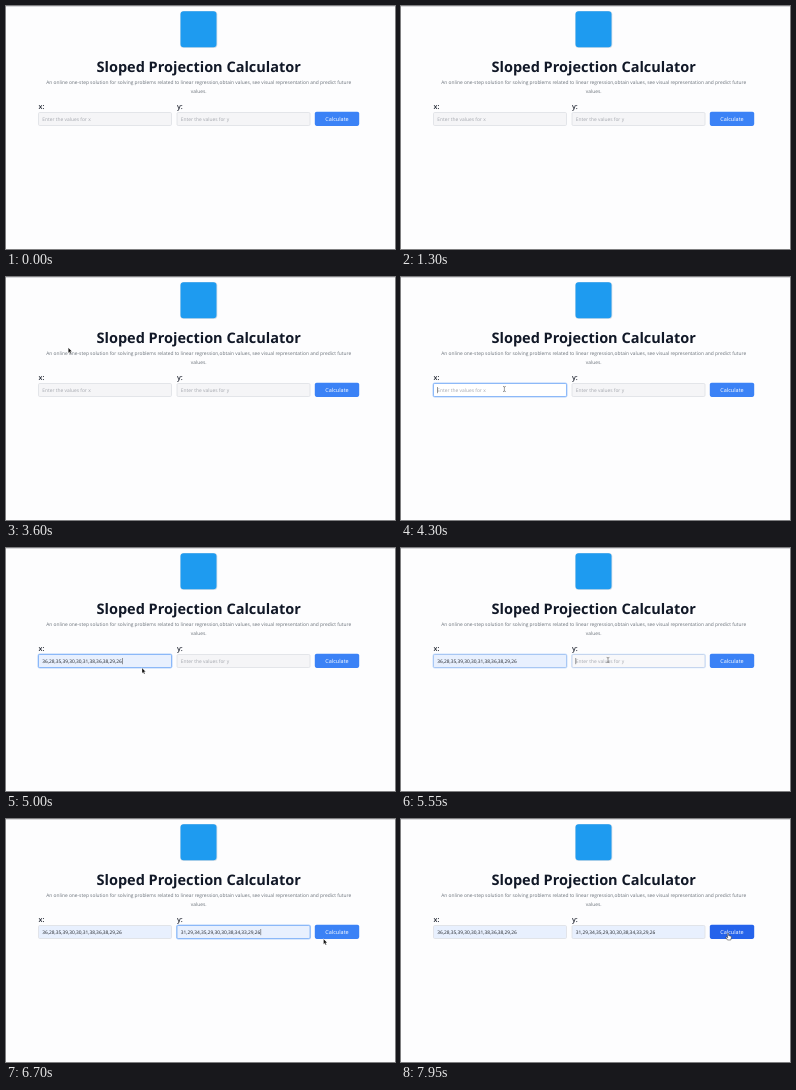
An HTML page that plays this animation: 389x243 px, repeating every 8 s.

```html
<!DOCTYPE html>
<html lang="en">
<head>
<meta charset="utf-8">
<title>Sloped Projection Calculator</title>
<style>
  html, body { margin: 0; width: 100%; height: 100%; overflow: hidden; background: #fdfdfe; }
  svg { display: block; }
  text { font-family: "Open Sans", "Noto Sans", sans-serif; text-rendering: geometricPrecision; }
  .mid { text-anchor: middle; }
  .title { font-size: 14.5px; font-weight: 700; fill: #111827; }
  .intro { font-size: 4.86px; fill: #697079; }
  .label { font-size: 7.2px; font-weight: 600; fill: #1f2430; }
  .hint { font-size: 4.9px; fill: #a3a6ad; }
  .value { font-size: 4.85px; fill: #20242b; }
  .button { font-size: 5.5px; fill: #fff; }
</style>
</head>
<body>
<svg id="stage" width="389" height="243" viewBox="0 0 389 243">
  <rect width="389" height="1" fill="#d9d9dc"/>
  <rect x="174.3" y="5" width="37" height="37" rx="3.5" fill="#d3dde6"/>
  <rect x="174.5" y="5.2" width="36" height="36" rx="3.2" fill="#1e9bf0"/>
  <text class="title mid" x="192.7" y="65.6">Sloped Projection Calculator</text>
  <text class="intro mid" x="192.7" y="78.3">An online one-step solution for solving problems related to linear regression,obtain values, see visual representation and predict future</text>
  <text class="intro mid" x="192.7" y="86.7">values.</text>
  <g id="form"></g>
  <rect id="button" x="308.8" y="105.8" width="44.4" height="14.1" rx="1.8"/>
  <text class="button mid" x="331" y="115.1">Calculate</text>
  <g id="pointer" stroke-linejoin="round" stroke-linecap="round">
    <path id="arrow" d="M0 0V5.2L1.2 4.2L2.1 6.1L3 5.7L2.1 3.8H3.7Z" fill="#111" stroke="#fff" stroke-width=".3"/>
    <path id="beam" d="M-1 -2.6Q0 -2.6 0 -2V2Q0 2.6 -1 2.6M1 -2.6Q0 -2.6 0 -2M0 2Q0 2.6 1 2.6" fill="none" stroke="#444" stroke-width=".5"/>
    <path id="hand" d="M-.6 .4Q0 -.5 .6 .4V2.6L3 3.2Q3.5 3.4 3.4 4.2L2.8 7H-.5L-2.3 4.5Q-2.2 3.6 -1.4 4.1L-.6 4.7Z" fill="#fff" stroke="#222" stroke-width=".5"/>
  </g>
</svg>
<script>
const LOOP = 8000, FADE = 150;
const TOP = 106, BOTTOM = 119.6;
const $ = id => document.getElementById(id);

const fields = [
  { name: "x", x: 32.5, values: "36,28,35,39,30,30,31,38,36,38,29,26",
    focus: 4050, preview: 4600, fill: 4880, blur: 5500 },
  { name: "y", x: 171, values: "31,29,34,35,29,30,30,38,34,33,29,26",
    focus: 5500, preview: 5850, fill: 6350, blur: 7250 }
];

// time, x, y of the pointer tip
const path = [
  [3350, 19, 30], [3850, 105, 111], [3900, 103.4, 112], [4350, 103.4, 112],
  [4700, 125, 129], [4850, 130, 129], [5000, 136, 120], [5350, 207, 112],
  [5550, 207, 112], [5900, 195.5, 129], [6350, 196, 129], [6700, 317.5, 120],
  [7050, 331, 114], [7650, 331, 114], [7800, 325, 116], [7950, 327, 114]
];

function add(parent, tag, attrs, content = "") {
  const el = document.createElementNS("http://www.w3.org/2000/svg", tag);
  for (const key in attrs) el.setAttribute(key, attrs[key]);
  el.textContent = content;
  return parent.appendChild(el);
}

const clamp = v => Math.max(0, Math.min(1, v));
const mix = (a, b, k) => a + (b - a) * k;
const blend = (a, b, k) => `rgb(${a.map((v, i) => Math.round(mix(v, b[i], k)))})`;
const show = (el, on) => el.setAttribute("visibility", on ? "visible" : "hidden");

for (const f of fields) {
  const form = $("form"), left = f.x + 3.8;
  add(form, "text", { class: "label", x: f.x, y: 103 }, f.name + ":");
  f.ring = add(form, "rect", { x: f.x - 1, y: 105.5, width: 135, height: 15, rx: 2.2, fill: "#b4d2fb" });
  f.box = add(form, "rect", { x: f.x, y: 106.5, width: 133, height: 13, rx: 1.2, "stroke-width": .8 });
  f.hint = add(form, "text", { class: "hint", x: left, y: 114.9 }, `Enter the values for ${f.name}`);
  f.value = add(form, "text", { class: "value", x: left, y: 114.9 }, f.values);
  f.caret = add(form, "rect", { y: 110, width: .5, height: 6.2, fill: "#333" });
}

function drawField(f, t) {
  const glow = clamp((t - f.focus) / FADE) - clamp((t - f.blur) / FADE);
  const previewed = t >= f.preview, filled = t >= f.fill;
  const since = t - (filled ? f.fill : f.focus);
  f.ring.setAttribute("opacity", glow);
  f.box.setAttribute("stroke", blend([222, 224, 229], [122, 174, 248], glow));
  f.box.setAttribute("fill", previewed ? "#e8f0fe" : blend([245, 245, 247], [255, 255, 255], glow));
  show(f.hint, !previewed);
  show(f.value, previewed);
  f.value.style.fontSize = filled ? "4.85px" : "4.25px";
  f.caret.setAttribute("x", f.x + (filled ? 83.6 : 3.6));
  show(f.caret, t >= f.focus && t < f.blur && since % 1000 < 500);
}

function pointerAt(t) {
  const next = path.findIndex(p => p[0] > t);
  if (next < 0) return path[path.length - 1].slice(1);
  const [t0, x0, y0] = path[Math.max(0, next - 1)], [t1, x1, y1] = path[next];
  const u = clamp((t - t0) / (t1 - t0 || 1)), k = u * u * (3 - 2 * u);
  return [mix(x0, x1, k), mix(y0, y1, k)];
}

function drawPointer(t) {
  const [x, y] = pointerAt(t), seen = t >= path[0][0];
  const inRow = y > TOP && y < BOTTOM;
  const onField = inRow && fields.some(f => x > f.x && x < f.x + 133);
  const onButton = inRow && x > 309 && x < 353;
  $("pointer").setAttribute("transform", `translate(${x} ${y})`);
  show($("arrow"), seen && !onField && !onButton);
  show($("beam"), seen && onField);
  show($("hand"), seen && onButton);
}

function frame() {
  const t = performance.now() % LOOP;
  for (const f of fields) drawField(f, t);
  $("button").setAttribute("fill", blend([59, 130, 246], [37, 99, 235], clamp((t - 6760) / FADE)));
  drawPointer(t);
  requestAnimationFrame(frame);
}
frame();
</script>
</body>
</html>
```
